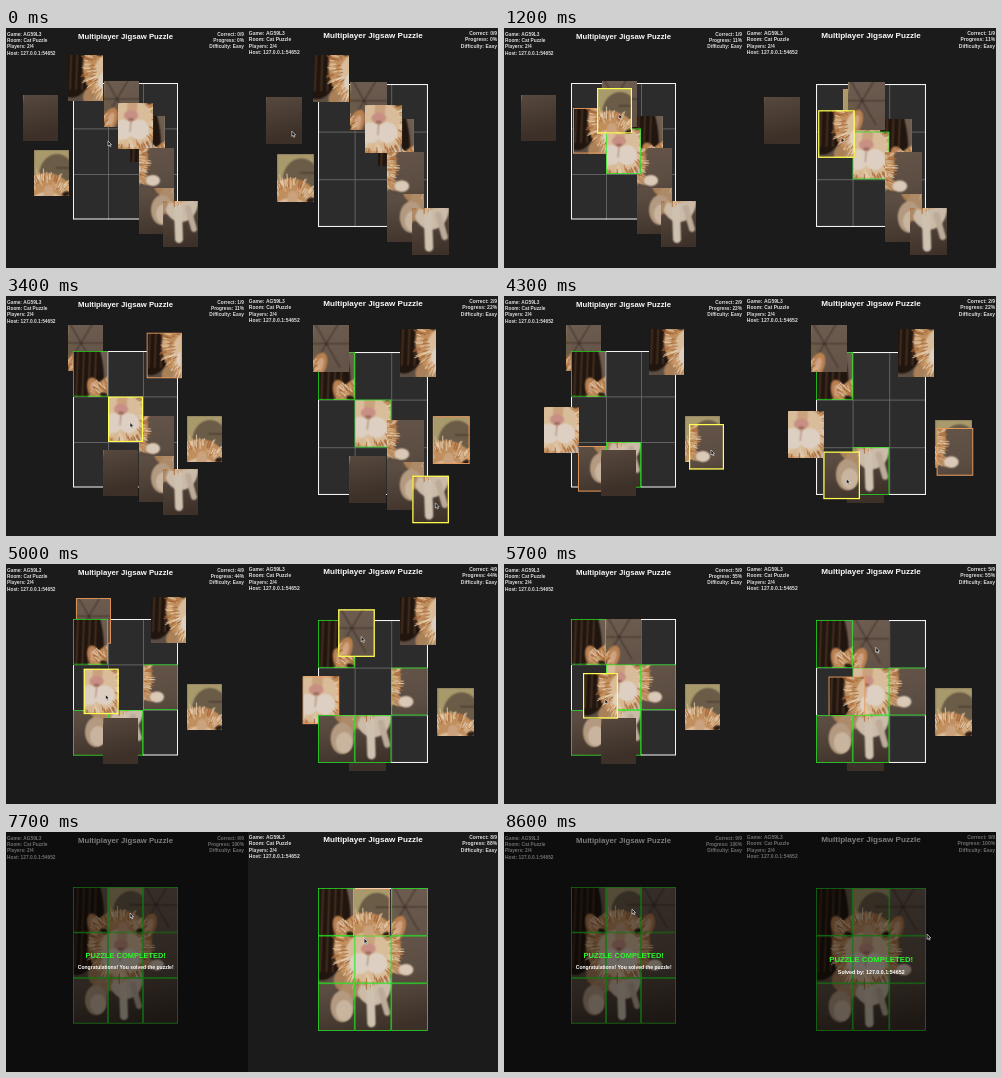
An HTML page with a canvas for the animation above (8700 ms loop, 492 by 240 pixels).

```html
<!DOCTYPE html>
<html lang="en">
<head>
<meta charset="utf-8">
<title>Multiplayer Jigsaw Puzzle</title>
<style>
html, body { margin: 0; width: 100%; height: 100%; overflow: hidden; background: #1b1b1b; }
canvas { display: block; }
</style>
</head>
<body>
<canvas id="stage" width="492" height="240"></canvas>
<script>
const ctx = document.getElementById('stage').getContext('2d');
const LOOP = 8700, STEP = 100;
const REACH = 350, HOLD = 150, APPROACH = 300, LAG = 100; // ms
const GRAB = [22, 26]; // where a cursor grips a piece
const BOARD = { x: 67, y: 55, w: 105, h: 136.5 };
const CELL = { w: BOARD.w / 3, h: BOARD.h / 3 };
const PANELS = [{ scale: 1, x: 0, y: 0 }, { scale: 1.0476, x: 241.81, y: -1.62 }];
const homeOf = i => [BOARD.x + i % 3 * CELL.w, BOARD.y + Math.floor(i / 3) * CELL.h];

function seeded(seed) {
  return () => (seed = seed * 16807 % 2147483647) / 2147483647;
}

// ---- Picture: a ginger cat on a sofa, in soft flat tones ----
function paintCat() {
  const detail = 4;
  const canvas = document.createElement('canvas');
  canvas.width = BOARD.w * detail;
  canvas.height = BOARD.h * detail;
  const p = canvas.getContext('2d');
  p.scale(detail, detail);
  p.lineCap = 'round';

  const oval = (color, x, y, rx, ry, turn = 0) => {
    p.fillStyle = color;
    p.beginPath();
    p.ellipse(x, y, rx, ry, turn, 0, 7);
    p.fill();
  };
  const line = (color, width, x1, y1, x2, y2) => {
    p.strokeStyle = color;
    p.lineWidth = width;
    p.beginPath();
    p.moveTo(x1, y1);
    p.lineTo(x2, y2);
    p.stroke();
  };

  const sofa = p.createLinearGradient(30, 0, 60, BOARD.h);
  sofa.addColorStop(0, '#6f5e52');
  sofa.addColorStop(.65, '#5c4d42');
  sofa.addColorStop(1, '#3c3028');
  p.fillStyle = sofa;
  p.fillRect(0, 0, BOARD.w, BOARD.h);

  p.filter = 'blur(3px)';
  // chair
  oval('#21160f', 4, 30, 27, 58);
  for (let x = 2; x < 26; x += 6) line('#543a28', 1.3, x + 3, 0, x, 80);
  // cushion
  p.fillStyle = '#a99a6c';
  p.fillRect(CELL.w, 0, CELL.w, 40);
  oval('#6b5c48', 58, 26, 18, 22);
  // sofa seams fan out from one button
  for (let a = 0; a < 6; a += 1.05)
    line('#3d3028', .9, 83, 18, 83 + 26 * Math.cos(a), 18 + 26 * Math.sin(a));

  // body and legs
  oval('#a98058', 40, 88, 25, 16);
  oval('#cbbba8', 53, 92, 17, 20);
  line('#cfc1b0', 8, 50, 98, 51, 129);
  line('#bcab98', 6, 60, 98, 66, 119);
  line('#b98e66', 9, 66, 70, 78, 78);
  oval('#d9c9b6', 84, 78, 7, 5.5);
  line('#ad8a68', 16, 33, 90, 25, 108);
  oval('#b39a80', 23, 113, 11, 15);
  oval('#c9b59f', 25, 117, 8, 10);

  // head
  for (const side of [-1, 1]) {
    oval('#b98050', 49 + side * 27, 39, 7, 13, side * .35);
    oval('#cfa283', 49 + side * 27, 40, 3.5, 9, side * .35);
  }
  oval('#c18f5e', 47, 58, 32, 35);
  oval('#d9bd9b', 48, 66, 23, 24);

  // fur strokes radiate from the nose
  p.filter = 'blur(1.5px)';
  const random = seeded(7);
  const furTones = ['#a7683a', '#d9b388', '#e3cfb4'];
  for (let i = 0; i < 260; i++) {
    const a = random() * 6.283, r = 19 + random() * 11, length = 3 + random() * 4;
    const dx = Math.cos(a), dy = Math.sin(a) * 1.1;
    line(furTones[i % 3], .9, 47 + dx * r, 58 + dy * r, 47 + dx * (r + length), 58 + dy * (r + length));
  }

  p.filter = 'blur(3px)';
  line('#cba27e', 10, 50, 40, 49, 52);
  for (const side of [-1, 1]) {
    oval('#2a1d13', 49 + side * 18, 44, 4, 2.5, side * -.3);
    oval('#ddd0c2', 48 + side * 8, 72, 10, 10);
  }
  oval('#c88f84', 48, 58, 7, 5);
  oval('#9c6a60', 48, 62, 3, 1.5);
  line('#a88678', 1, 48, 64, 47, 74);
  return canvas;
}
const photo = paintCat();

// ---- Motion: a drag moves a piece and its player's cursor together ----
const pieces = [[124, 88], [28, 122], [98, 53], [62, 27], [112, 75], [133, 120], [133, 160], [157, 173], [17, 67]]
  .map(([x, y]) => ({ path: [[0, x, y]], drags: [] }));
const cursors = [[[0, 102, 113]], [[0, 42, 100]]];
const last = list => list[list.length - 1];

// An idle cursor rests, then travels just before it is needed.
function sendCursor(player, t, x, y) {
  const [t0, x0, y0] = last(cursors[player]);
  cursors[player].push([Math.max(t0, t - APPROACH), x0, y0], [t, x, y]);
}

// Visits each spot in turn, resting in between; without spots, goes home.
function drag(player, piece, start, ...spots) {
  const { path, drags } = pieces[piece];
  const keys = [[start, ...last(path).slice(1)]];
  (spots.length ? spots : [homeOf(piece)]).forEach((spot, i) => {
    const t = last(keys)[0];
    if (i) keys.push([t + HOLD, ...last(keys).slice(1)]);
    keys.push([last(keys)[0] + REACH, ...spot]);
  });
  const grips = keys.map(([t, x, y]) => [t, x + GRAB[0], y + GRAB[1]]);
  sendCursor(player, ...grips[0]);
  cursors[player].push(...grips);
  path.push(...keys);
  drags.push({ player, start, end: last(keys)[0] });
}
const dragHomeVia = (player, piece, start, spot) => drag(player, piece, start, spot, homeOf(piece));

const HOST = 0, GUEST = 1;
// In order of time, since each drag starts where the previous one left the piece.
drag(HOST, 4, 200);
dragHomeVia(HOST, 1, 750, [93, 60]);
dragHomeVia(GUEST, 3, 750, [69, 80]);
drag(HOST, 2, 1650, [62, 29]);
dragHomeVia(HOST, 0, 2100, [72, 63]);
drag(GUEST, 8, 2100, [102, 137], [97, 154]);
drag(HOST, 1, 3000, [181, 120]);
drag(GUEST, 3, 3000, [145, 33]);
drag(HOST, 4, 3400, [40, 111]);
drag(GUEST, 7, 3400);
dragHomeVia(GUEST, 6, 3850, [74, 150]);
dragHomeVia(HOST, 5, 3900, [185, 128]);
drag(HOST, 4, 4800);
drag(GUEST, 2, 4800, homeOf(1));
dragHomeVia(HOST, 3, 5250, [79, 109]);
drag(GUEST, 8, 6050);
drag(HOST, 2, 6150);
drag(HOST, 1, 6550, [73, 65]);
sendCursor(HOST, 7000, 125, 82);
sendCursor(GUEST, 7000, 111, 103);
drag(HOST, 1, 7300);
sendCursor(HOST, 8500, 128, 77);
sendCursor(GUEST, 8500, 173, 99);

function locate(keys, t) {
  const next = keys.findIndex(k => k[0] > t);
  if (next < 1) return (next < 0 ? last(keys) : keys[0]).slice(1);
  const [t0, x0, y0] = keys[next - 1], [t1, x1, y1] = keys[next];
  const u = (t - t0) / (t1 - t0), ease = u * u * (3 - 2 * u);
  return [x0 + (x1 - x0) * ease, y0 + (y1 - y0) * ease];
}

// What one player sees of a piece: the other's moves arrive late,
// and only one's own grabs bring a piece to the front.
function view(index, viewer, now) {
  const { path, drags } = pieces[index];
  const begun = drags.filter(d => d.start <= now);
  const latest = last(begun);
  const own = last(begun.filter(d => d.player === viewer));
  const t = latest && latest.player !== viewer ? now - LAG : now;
  const [x, y] = locate(path, t);
  const [homeX, homeY] = homeOf(index);
  const holder = latest && t >= latest.start && t < latest.end ? latest.player : -1;
  const placed = holder < 0 && x === homeX && y === homeY;
  return { index, x, y, holder, placed, depth: own ? own.start : index };
}

// ---- Drawing ----
function text(str, x, y, size, color, align = 'left') {
  ctx.font = `bold ${size}px "Liberation Sans", Arial, sans-serif`;
  ctx.textAlign = align;
  ctx.textBaseline = 'middle';
  ctx.fillStyle = color;
  ctx.fillText(str, x, y);
}

function outline(x, y, w, h, color, width) {
  ctx.strokeStyle = color;
  ctx.lineWidth = width;
  ctx.strokeRect(x + width / 2, y + width / 2, w - width, h - width);
}

function drawBoard() {
  const { x, y, w, h } = BOARD;
  ctx.fillStyle = '#2c2c2c';
  ctx.fillRect(x, y, w, h);
  ctx.fillStyle = '#6e6e6e';
  for (let i = 1; i < 3; i++) {
    ctx.fillRect(x + i * CELL.w, y, .8, h);
    ctx.fillRect(x, y + i * CELL.h, w, .8);
  }
  outline(x, y, w, h, '#f4f4f4', 1);
}

function drawPiece({ index, x, y, holder, placed }, viewer) {
  const { w, h } = CELL, sw = photo.width / 3, sh = photo.height / 3;
  ctx.drawImage(photo, index % 3 * sw, Math.floor(index / 3) * sh, sw, sh, x, y, w, h);
  if (placed) outline(x, y, w, h, '#22ee22', .7);
  else if (holder === viewer) outline(x, y, w, h, '#ffff50', 1.2);
  else if (holder >= 0) outline(x, y, w, h, '#e8995a', .9);
}

function drawHeader(correct) {
  const column = (lines, x, align) =>
    lines.forEach((str, i) => text(str, x, 6.9 + i * 6.1, 4.8, '#dcdcdc', align));
  text('Multiplayer Jigsaw Puzzle', 119.5, 9, 7.74, '#fafafa', 'center');
  column(['Game: AG59L3', 'Room: Cat Puzzle', 'Players: 2/4', 'Host: 127.0.0.1:54652'], 1, 'left');
  column([`Correct: ${correct}/9`, `Progress: ${Math.floor(correct * 100 / 9)}%`, 'Difficulty: Easy'], 238, 'right');
}

function drawVictory(message) {
  ctx.fillStyle = 'rgba(0,0,0,.5)';
  ctx.fillRect(0, 0, 242, 240);
  text('PUZZLE COMPLETED!', 119.7, 123.8, 7.45, '#2cf52c', 'center');
  text(message, 119.7, 135.5, 5.05, '#fff', 'center');
}

function drawCursor([x, y]) {
  ctx.beginPath();
  [[0, 0], [0, 5], [1.2, 4], [2, 5.8], [2.9, 5.4], [2.1, 3.7], [3.6, 3.6]]
    .forEach(([dx, dy]) => ctx.lineTo(x + dx, y + dy));
  ctx.closePath();
  ctx.fillStyle = '#111';
  ctx.fill();
  ctx.strokeStyle = '#eee';
  ctx.lineWidth = .6;
  ctx.stroke();
}

function drawPanel(viewer, t) {
  const { scale, x, y } = PANELS[viewer];
  ctx.setTransform(scale, 0, 0, scale, x, y);
  const seen = pieces.map((_, i) => view(i, viewer, t)).sort((a, b) => a.depth - b.depth);
  const correct = seen.filter(piece => piece.placed).length;
  drawBoard();
  seen.forEach(piece => drawPiece(piece, viewer));
  drawHeader(correct);
  if (correct === pieces.length)
    drawVictory(viewer === HOST ? 'Congratulations! You solved the puzzle!' : 'Solved by: 127.0.0.1:54652');
  drawCursor(locate(cursors[viewer], t));
}

function frame() {
  const t = Math.floor(performance.now() % LOOP / STEP) * STEP;
  ctx.setTransform(1, 0, 0, 1, 0, 0);
  ctx.fillStyle = '#1b1b1b';
  ctx.fillRect(0, 0, 492, 240);
  drawPanel(HOST, t);
  drawPanel(GUEST, t);
  requestAnimationFrame(frame);
}
frame();
</script>
</body>
</html>
```
